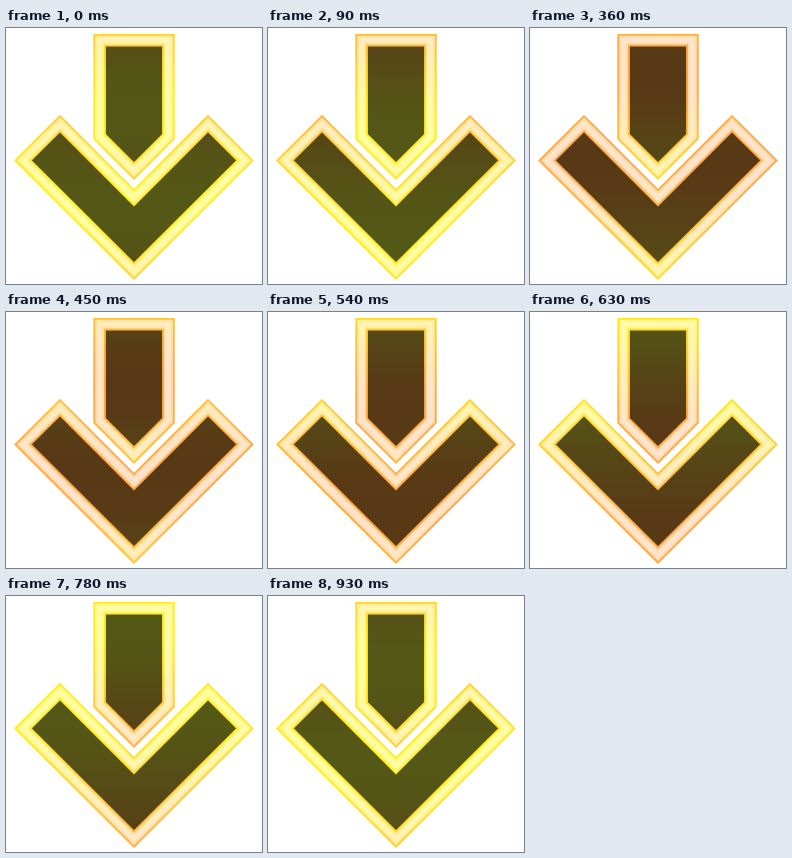
Animation, 256 px wide and 256 px high, one loop 960 ms. Source, as an HTML page with a canvas:

```html
<!DOCTYPE html>
<html>
<head>
<meta charset="utf-8">
<style>
  html, body { margin: 0; width: 100%; height: 100%; overflow: hidden; background: #fff; }
  canvas { display: block; width: 256px; height: 256px; }
</style>
</head>
<body>
<canvas id="stage" width="256" height="256"></canvas>
<script>
const ctx = document.getElementById('stage').getContext('2d');
const LOOP = 960, STEP = 30;

// Centre lines of the glowing borders, with the vertical extent of each part
const parts = [
  { top: 6, bottom: 152, path: new Path2D('M93.6 12.2H162.4V108.6L128 143L93.6 108.6Z') },
  { top: 88, bottom: 251, path: new Path2D('M54 95.6L17 132.4L128 243L239 132.4L202 95.6L128 169.6Z') }
];

// Each colour pair runs from yellow to orange
const core = [[84, 88, 22], [88, 57, 22]];
const line = [[255, 238, 38], [255, 168, 70]];
const band = [[255, 250, 132], [255, 219, 182]];
const glow = [[255, 254, 164], [255, 228, 204]];

const mix = ([a, b], k) => `rgb(${a.map((v, i) => Math.round(v + (b[i] - v) * k))})`;

// Colour wave that travels from the top of a part to its bottom
function wave({ top, bottom }, pair, time) {
  const gradient = ctx.createLinearGradient(0, top, 0, bottom);
  for (let i = 0; i <= 16; i++) {
    const peak = 250 + 430 * i / 16;
    const warmth = 0.5 + 0.5 * Math.cos((time - peak) / LOOP * 2 * Math.PI);
    gradient.addColorStop(i / 16, mix(pair, warmth));
  }
  return gradient;
}

function outline(part, pair, width, time) {
  ctx.strokeStyle = wave(part, pair, time);
  ctx.lineWidth = width;
  ctx.stroke(part.path);
}

function draw() {
  const time = Math.floor(performance.now() % LOOP / STEP) * STEP;
  ctx.clearRect(0, 0, 256, 256);
  for (const part of parts) {
    ctx.fillStyle = wave(part, core, time);
    ctx.fill(part.path);
    outline(part, line, 12.6, time);
    outline(part, band, 8.8, time);
    outline(part, glow, 4.5, time);
  }
  requestAnimationFrame(draw);
}
draw();
</script>
</body>
</html>
```
